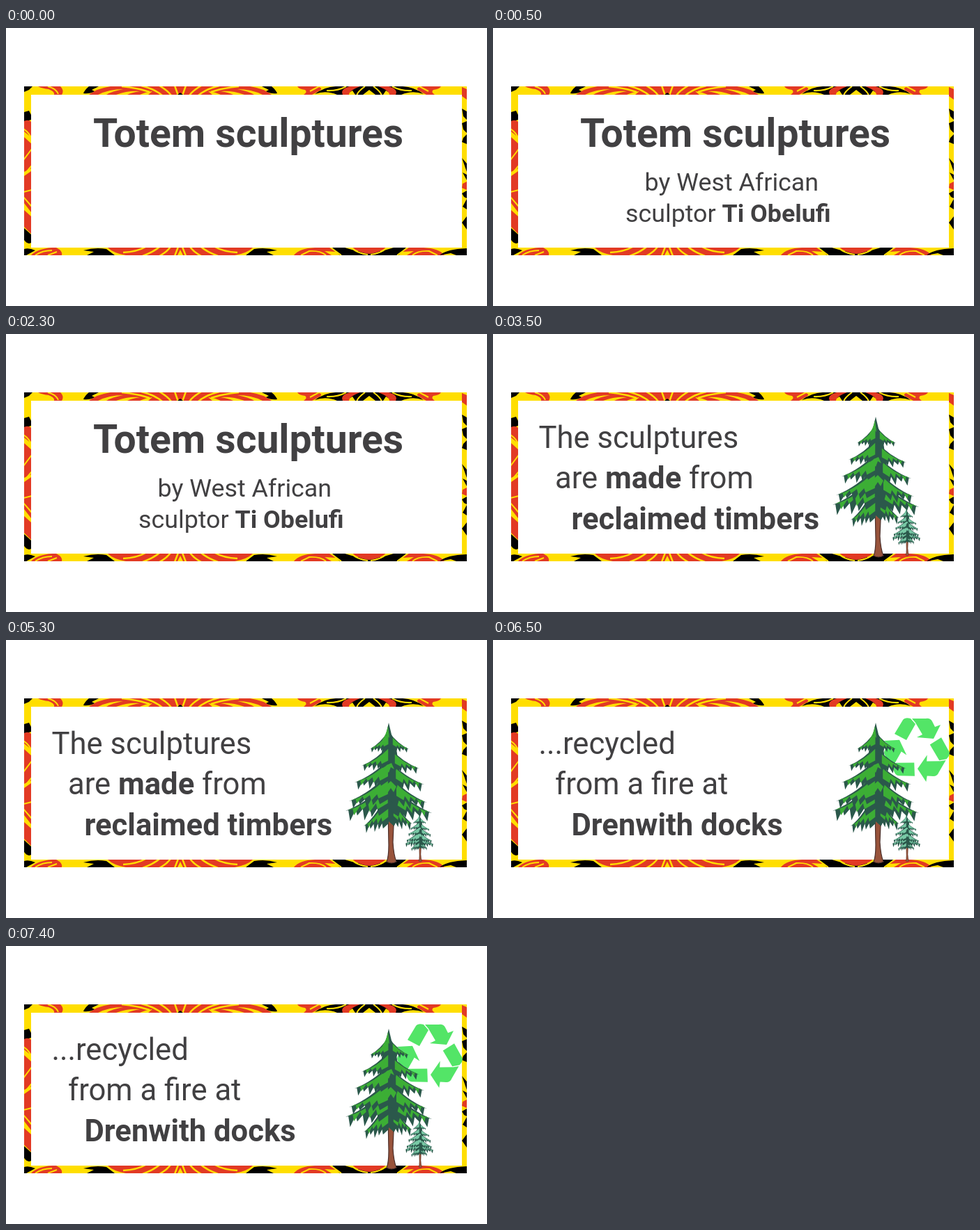
These frames come from a looping animation (690x400 px, 8000 ms). An HTML page with a canvas:

```html
<!DOCTYPE html>
<html lang="en">
<head>
<meta charset="utf-8">
<title>Totem sculptures</title>
<style>
  html, body { margin: 0; width: 100%; height: 100%; overflow: hidden; background: #fff; }
  canvas { display: block; width: 690px; height: 400px; }
</style>
</head>
<body>
<canvas id="stage" width="690" height="400"></canvas>
<script>
const ctx = document.getElementById('stage').getContext('2d');
const LOOP = 8000;
const YELLOW = '#ffde00', RED = '#e23a24', BLACK = '#000', INK = '#414042';
const TAU = Math.PI * 2;

function fill(color, d) {
  ctx.fillStyle = color;
  ctx.fill(new Path2D(d));
}

function stroke(color, width, d) {
  ctx.strokeStyle = color;
  ctx.lineWidth = width;
  ctx.stroke(new Path2D(d));
}

// Draws a half motif on both sides of a vertical axis.
function mirrored(axis, draw) {
  for (const side of [-1, 1]) {
    ctx.save();
    ctx.translate(axis, 0);
    ctx.scale(side, 1);
    draw();
    ctx.restore();
  }
}

function topMotifs() {
  fill(BLACK, 'M26 84H38L33 89L26 92Z');
  fill(RED, 'M46 84H78Q84 90 80 96H69Q70 91 61 88Q52 87 46 84Z');
  stroke(YELLOW, 2, 'M60 84Q72 87 75 95');
  mirrored(250, () => {
    fill(RED, 'M0 84H100Q120 87 131 96H0Z');
    fill(BLACK, 'M117 84H131Q137 89 139 94Q130 95 123 91L127 89Z');
    fill(YELLOW, 'M118 96Q102 88 82 88Q98 91 106 96ZM92 96Q76 90 58 91Q70 93 76 96ZM58 96Q50 92 40 91L46 96Z');
    stroke(YELLOW, 2.5, 'M3 97L8 83M13 97Q18 90 30 83M26 97Q36 88 56 83M44 92Q62 86 84 84');
    fill(BLACK, 'M0 93L4 96H0Z');
  });
  mirrored(521, () => {
    fill(RED, 'M103 84H76Q65 86 71 90L82 96H94Q88 92 92 89Q101 88 103 84Z');
    fill(BLACK, 'M0 84H42Q62 83 78 95Q62 89 46 96H34L24 90L20 96H9L0 89Z');
    fill(RED, 'M13 84H28Q42 88 38 96H29Q29 90 13 84Z');
    stroke(YELLOW, 2, 'M6 84Q16 91 18 97M33 84Q46 91 61 90M72 84L85 91');
  });
}

function bottomMotifs() {
  fill(BLACK, 'M26 318Q33 316 42 320L29 327H26Z');
  fill(RED, 'M36 327Q44 318 66 316H72Q82 321 80 327Z');
  stroke(YELLOW, 2, 'M42 327Q52 320 66 320M60 327L73 322');
  mirrored(250, () => {
    fill(RED, 'M0 316H104Q96 324 78 327H0Z');
    fill(BLACK, 'M139 320Q122 315 106 318L94 327H134L124 322Z');
    stroke(YELLOW, 2.5, 'M3 315L8 328M14 315Q20 323 30 328M30 315Q38 322 54 328M50 315Q62 322 82 323');
    fill(YELLOW, 'M0 327H4L0 319Z');
  });
  mirrored(521, () => {
    fill(BLACK, 'M0 321H18L35 316H53L42 327H0Z');
    fill(RED, 'M0 316H24Q16 323 0 325ZM108 327Q100 317 78 316H57L47 322L64 321L54 327Z');
    stroke(YELLOW, 2, 'M25 316Q18 324 2 326M62 327Q70 320 86 321L98 327M40 327L55 316');
  });
  fill(BLACK, 'M622 327Q632 318 661 317V327H646L638 324Z');
}

function sideMotifs() {
  fill(BLACK, 'M26 121L33 119L36 125V132L26 135Z');
  fill(RED, 'M26 134Q32 131 36 135V157L26 149ZM26 157L36 166V202L26 207ZM26 213L36 206V265L26 252ZM26 262L36 271V296L26 286Z');
  stroke(YELLOW, 2, 'M25 145Q34 151 37 160M25 190L37 174M25 212L37 198M25 236L37 233M25 243L37 257');
  fill(BLACK, 'M26 288L36 297V309Q31 312 26 305Z');

  fill(RED, 'M654 85L661 88V103L654 98ZM655 224L661 221V233L654 230Z');
  fill(BLACK, 'M654 116L661 120V132L656 127ZM654 137L661 134V151L656 146ZM656 158L661 153V167L654 164ZM654 187L661 195V207ZM655 208L661 211V219ZM654 238L661 234V245L657 243ZM655 257L661 246V261ZM654 280L661 271V290Z');
}

function frame() {
  fill('#fff', 'M0 0H690V400H0Z');
  ctx.save();
  ctx.clip(new Path2D('M26 84H661V327H26ZM36 96H654V316H36Z'), 'evenodd');
  fill(YELLOW, 'M26 84H661V327H26Z');
  topMotifs();
  bottomMotifs();
  sideMotifs();
  ctx.restore();
}

// Text between asterisks is bold.
function text(x, y, size, content) {
  ctx.fillStyle = INK;
  content.split('*').forEach((run, i) => {
    ctx.font = `${i % 2 ? 600 : 400} ${size}px Roboto, sans-serif`;
    ctx.fillText(run, x, y);
    x += ctx.measureText(run).width;
  });
}

function stairs(...lines) {
  lines.forEach((line, i) => text(65.5 + 23.5 * i, 164 + 58.3 * i, 43.6, line));
}

// A drooping bough; its toothed lower edge lies at the given sag of its fall.
function bough(color, x0, y0, x1, y1, sag, depth, teeth) {
  const dx = x1 - x0, dy = y1 - y0;
  ctx.fillStyle = color;
  ctx.beginPath();
  ctx.moveTo(x0, y0);
  ctx.quadraticCurveTo(x0 + dx * 0.45, y0 + dy * 0.7, x1, y1);
  for (let k = 1; k <= teeth; k++) {
    const u = 1 - k / (teeth + 1);
    const edge = y0 + dy * (sag + (1 - sag) * u * u);
    const length = depth * (0.75 + 0.25 * Math.sin(k * 2.4));
    ctx.lineTo(x0 + dx * (u + 0.1), edge);
    ctx.lineTo(x0 + dx * (u + 0.06), edge + length);
  }
  ctx.lineTo(x0, y0 + dy * sag);
  ctx.fill();
}

// Tip x, tip y, root y, tooth depth; lowest first.
const boughs = [
  [-36, 149, 96, 12], [34, 146, 96, 11], [-62, 127, 82, 17], [62, 130, 84, 14],
  [-57, 113, 72, 12], [55, 115, 74, 12],
  [-49, 86, 52, 12], [51, 89, 54, 12], [-39, 62, 33, 9], [44, 66, 35, 9],
  [-27, 38, 11, 6], [29, 38, 13, 6]
];

function tree(x, y, scale, dark, light) {
  ctx.save();
  ctx.translate(x, y);
  ctx.scale(scale, scale);
  const trunk = 'M-1 125L0 176Q0 193 -3 200Q4 204 11 200Q7 190 6 172L8 125Z';
  fill('#98533b', trunk);
  stroke('#4b302b', 1.2, trunk);
  fill(dark, 'M0 0L4 17L10 30L15 66L19 100L22 143L14 136L8 148L2 134L-6 146L-15 138L-17 98L-13 62L-8 29L-4 17Z');
  for (const [tx, ty, root, depth] of boughs) {
    bough(dark, 0, root, tx, ty, 0.92, depth, 5);
    const [inner, sag] = tx < 0 ? [0.02, 0.72] : [0.2, 0.66];
    bough(light, tx * inner, root + (ty - root) * (inner + 0.14), tx * 0.93, ty - 1, sag, depth * 0.7, 4);
  }
  fill(light, 'M-1 5L1 22L-3 17L-6 27L-9 24Q-4 18 -1 5ZM-3 61L4 58L8 67L3 64L0 72L-5 66L-10 71ZM-6 92L3 84L11 92L7 100L3 94L-3 103Z');
  ctx.restore();
}

function recycling() {
  ctx.save();
  ctx.translate(608, 157);
  for (let i = 0; i < 3; i++) {
    fill('#53e567', 'M-32 -22L-20 -42Q-17 -46 -9 -44L-2 -36L-15 -13ZM-7 -44H13Q19 -45 22 -40L26 -32L34 -35L24 -15L0 -17L8 -21L-2 -38Z');
    ctx.rotate(TAU / 3);
  }
  ctx.restore();
}

function trees() {
  tree(549, 119, 1, '#2b584b', '#3cae35');
  tree(593, 250, 0.34, '#2b584b', '#79c9a6');
}

function render(now) {
  const t = now % LOOP;
  frame();
  if (t < 3500) {
    text(125, 171, 57, '*Totem sculptures*');
    if (t >= 500) {
      text(217.5, 234, 35.8, 'by West African');
      text(190, 279, 35.8, 'sculptor *Ti Obelufi*');
    }
  } else if (t < 6500) {
    stairs('The sculptures', 'are *made* from', '*reclaimed timbers*');
    trees();
  } else {
    stairs('...recycled', 'from a fire at', '*Drenwith docks*');
    recycling();
    trees();
  }
}

const start = performance.now();
function tick() {
  render(performance.now() - start);
  requestAnimationFrame(tick);
}
tick();
</script>
</body>
</html>
```
